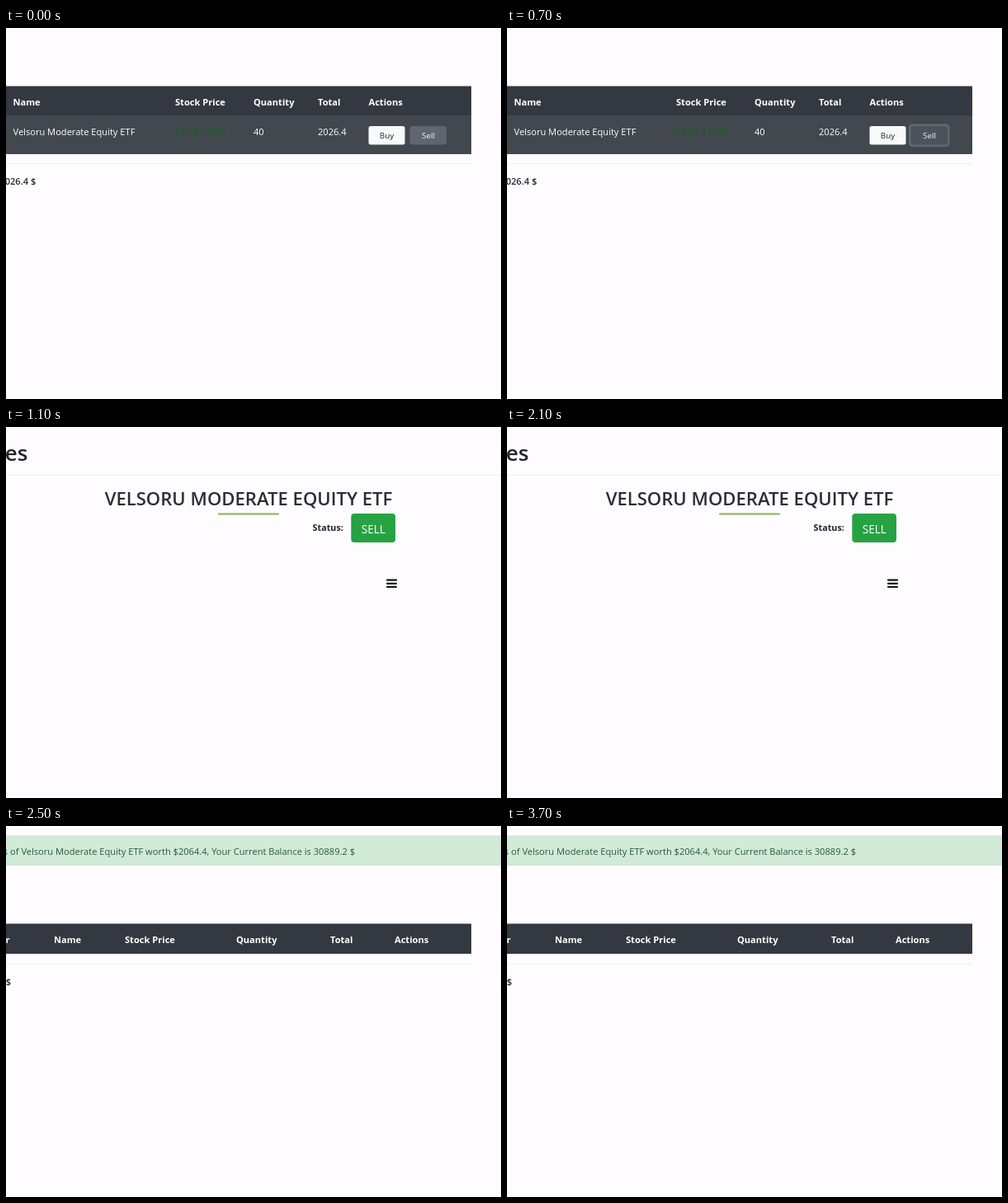
An HTML page with a canvas for the animation above (4 s loop, 600x450 px).

```html
<!DOCTYPE html>
<html lang="en">
<head>
<meta charset="utf-8">
<title>Stock portfolio</title>
<style>
html, body { margin: 0; height: 100%; overflow: hidden; background: #fefcff; }
canvas { display: block; }
</style>
</head>
<body>
<canvas id="stage" width="600" height="450"></canvas>
<script>
const LOOP = 4000;
const FUND = 'Velsoru Moderate Equity ETF';
const PAGE = '#fefcff', INK = '#212529', HEAD = '#343840', RULE = '#eeedf0';
const ctx = document.getElementById('stage').getContext('2d');

function text(str, x, y, { size = 11.1, weight = 400, color = INK, align = 'left' } = {}) {
  ctx.font = `${weight} ${size}px "Open Sans", "Noto Sans", sans-serif`;
  ctx.fillStyle = color;
  ctx.textAlign = align;
  ctx.fillText(str, x, y);
}

function box(x, y, w, h, color, r = 0) {
  ctx.fillStyle = color;
  ctx.beginPath();
  ctx.roundRect(x, y, w, h, r);
  ctx.fill();
}

// Progress from 0 to 1 between two times, in steps of 100 ms
function ramp(t, from, to) {
  const step = Math.floor(t / 100) * 100;
  return Math.min(1, Math.max(0, (step - from) / (to - from)));
}

function faded(alpha, draw) {
  ctx.globalAlpha = alpha;
  draw();
  ctx.globalAlpha = 1;
}

function tableHead(y, h, columns) {
  box(0, y, 564, h, HEAD);
  for (const [label, x] of columns)
    text(label, x, y + 23, { weight: 700, color: '#fff' });
}

function holdings(t) {
  tableHead(70.5, 36, [['Name', 8.5], ['Stock Price', 205], ['Quantity', 300],
    ['Total', 378], ['Actions', 439.5]]);
  box(0, 106, 564, 47, '#42484d');
  const cell = { color: '#fff' };
  text(FUND, 8.5, 129.5, cell);
  text('51.61 ↑ 0.95', 205, 129.5, { color: '#0b6a17' });
  text('40', 300, 129.5, cell);
  text('2026.4', 378, 129.5, cell);

  box(439.5, 119, 44, 22.5, '#f8f9fa', 2.5);
  text('Buy', 461.5, 134, { size: 9.8, align: 'center' });
  box(489.5, 119, 44.5, 22.5, '#60656f', 2.5);
  faded(ramp(t, 400, 600), () => {
    box(487, 116.5, 49.5, 27.5, '#616870', 4.5);
    box(489.5, 119, 44.5, 22.5, '#4d535c', 2.5);
  });
  text('Sell', 512, 134, { size: 9.8, color: '#f4f4f6', align: 'center' });

  box(0, 164, 564, 1, RULE);
  text('2026.4 $', 36.3, 190, { weight: 600, align: 'right' });
}

function details() {
  text('es', 26.5, 41, { size: 26, weight: 600, align: 'right' });
  box(0, 58, 600, 1, RULE);
  text(FUND.toUpperCase(), 294, 94.5, { size: 22.1, weight: 600, color: '#2c2e33', align: 'center' });
  box(257, 104.5, 74, 2, '#8ab54c', 1);
  text('Status:', 371.5, 125.5, { size: 10.8, weight: 700 });
  box(418.3, 105, 53.7, 35, '#27a243', 4);
  text('SELL', 445.3, 128.5, { size: 13.7, color: '#fff', align: 'center' });
  for (let i = 0; i < 3; i++) box(461, 184.5 + i * 4.2, 13, 2.2, '#16181b', 0.8);
}

function sold(t) {
  box(-5, 11.5, 610, 36.5, '#c8e5cf');
  box(-5, 12, 610, 35.5, '#d1ead8');
  text(`40 shares of ${FUND} worth $2064.4, Your Current Balance is 30889.2 $`,
    423, 34.5, { color: '#2b5a3a', align: 'right' });
  tableHead(118.5, 36.5, [['Name', 58], ['Stock Price', 144], ['Quantity', 279],
    ['Total', 393], ['Actions', 471]]);
  text('r', 4.5, 141.5, { weight: 700, color: '#fff', align: 'right' });
  box(0, 166.5, 564, 1, RULE);
  text('$', 6, 193, { weight: 600, align: 'right' });

  if (t >= 2800 && t < 3700) faded(ramp(t, 2700, 2900), () => {
    box(7, 446, 72, 4, '#85858a');
    box(8, 447, 70, 3, '#fff');
  });
}

function frame(now) {
  const t = now % LOOP;
  box(0, 0, 600, 450, PAGE);
  if (t < 800) holdings(t);
  else if (t < 2300) details();
  else sold(t);
  requestAnimationFrame(frame);
}
requestAnimationFrame(frame);
</script>
</body>
</html>
```
